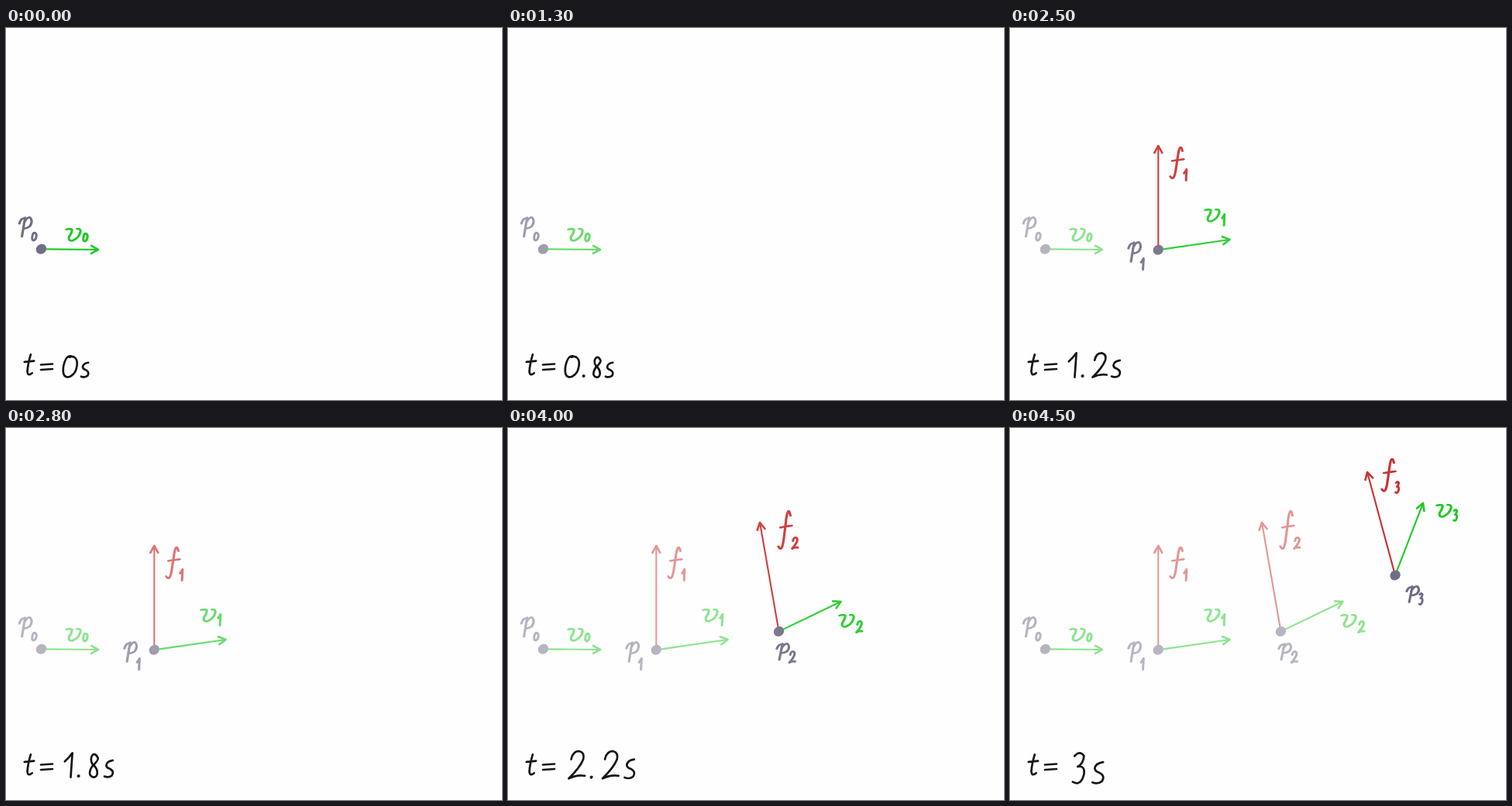
An HTML page for the animation above (6.5 s loop, 640 by 480 pixels).

```html
<!DOCTYPE html>
<html lang="en">
<head>
<meta charset="utf-8">
<title>Point, velocity and force over time</title>
<style>
  html, body { margin: 0; width: 100%; height: 100%; overflow: hidden; background: #fefefe; }
  svg { display: block; width: 100%; height: 100%; }
  path { fill: none; stroke-linecap: round; stroke-linejoin: round; vector-effect: non-scaling-stroke; }
</style>
</head>
<body>
<svg id="stage" viewBox="0 0 640 480"></svg>
<script>
const GRAY = '#716d86', GREEN = '#1fca24', RED = '#cc3030', INK = '#151515';
const LOOP = 6500, PERIOD = 1500, HOLD = 1000, STEP = 100, STEPS = 6;
const PEN = 2.7, DOT = 6.6;

// Pen strokes in a 20 x 20 box, with width / height ratio where it is fixed
const GLYPHS = {
  p: { d: 'M0 7Q3 1 8 2M9 1L4 20M7 7Q12 0 17 1Q22 5 16 10Q12 12 6 12' },
  v: { d: 'M0 2Q5 0 8 2Q8 7 4 13Q2 20 9 19Q18 15 20 5Q20 0 15 1' },
  f: { d: 'M18 3Q15 -2 12 4L8 15Q5 22 0 18.5M3 9L20 8' },
  t: { d: 'M13 0Q7 9 6 16Q7 21 16 17.5M0 7L20 6', ratio: 0.5 },
  s: { d: 'M18 0Q5 1 4 6Q5 9 12 10Q22 13 16 18Q9 21 0 19', ratio: 0.6 },
  0: { d: 'M11 0C3 -1 -1 11 1 17C4 23 17 19 19 10C21 3 16 -1 9 1', ratio: 0.72 },
  1: { d: 'M0 7Q10 4 18 0L14 20', ratio: 0.4 },
  2: { d: 'M3 6Q5 0 13 0Q20 1 18 6Q14 12 0 20Q10 17 20 18', ratio: 0.62 },
  3: { d: 'M3 2Q12 -2 18 2Q17 7 8 9Q20 8 18 14Q13 22 0 19', ratio: 0.45 },
  4: { d: 'M9 0L0 13L20 12M15 6L13 20', ratio: 0.6 },
  6: { d: 'M14 0Q1 8 1 15Q3 21 11 20Q19 18 18 13Q13 9 2 15', ratio: 0.55 },
  8: { d: 'M17 4C10 -3 0 4 7 9C20 14 17 20 9 20C-3 19 3 12 11 9C15 7 18 5 17 4', ratio: 0.5 },
  9: { d: 'M18 4C10 -4 0 4 2 9C5 14 15 9 18 3L13 20', ratio: 0.5 }
};

// Lettering rules; the height grows with the drop of the subscript
const SYMBOLS = {
  p: { color: GRAY, width: 20, subX: 16.5, height: drop => 20 + 0.4 * drop },
  v: { color: GREEN, width: 22, subX: 22, height: () => 19.5 },
  f: { color: RED, width: 21, subX: 18, height: drop => 1.5 * drop }
};

// Dot, arrow tips, and label anchors as [x, y, subscript drop]
const MOMENTS = [
  { dot: [45.5, 285.3], tips: { v: [119, 286] },
    labels: { p: [15.5, 242, 21], v: [76, 257, 7] } },
  { dot: [191.3, 286.3], tips: { f: [191.3, 152], v: [283.5, 273] },
    labels: { p: [151, 274, 22], f: [205, 151, 30], v: [250, 232, 7] } },
  { dot: [349.5, 262.5], tips: { f: [325, 122], v: [429.5, 224] },
    labels: { p: [345, 276, 11], f: [347, 104, 36], v: [426, 239, 9] } },
  { dot: [497, 190], tips: { f: [461, 57], v: [533, 97] },
    labels: { p: [510, 202, 10], f: [478, 37, 31], v: [549, 97, 7] } }
];

const stage = document.getElementById('stage');

function add(parent, tag, attrs = {}) {
  const node = document.createElementNS('http://www.w3.org/2000/svg', tag);
  for (const key in attrs) node.setAttribute(key, attrs[key]);
  return parent.appendChild(node);
}

function stroke(parent, d, color, width, transform = '') {
  add(parent, 'path', { d, stroke: color, 'stroke-width': width, transform });
}

function spot(parent, color, [x, y], r) {
  add(parent, 'ellipse', {
    rx: r * 1.05, ry: r * 0.95, fill: color, transform: `translate(${x} ${y}) rotate(-40)`
  });
}

// A broad nib: the same stroke twice, shifted sideways
function glyph(parent, color, name, x, y, width, height, nib = 0) {
  const sx = (width - PEN - nib) / 20, sy = (height - PEN) / 20;
  for (const shift of new Set([0, nib])) {
    stroke(parent, GLYPHS[name].d, color, PEN - nib / 2,
      `translate(${x + PEN / 2 + shift} ${y + PEN / 2}) scale(${sx} ${sy})`);
  }
}

function arrow(parent, color, [x1, y1], [x2, y2]) {
  const angle = Math.atan2(y2 - y1, x2 - x1);
  const tailX = x1 + DOT * Math.cos(angle), tailY = y1 + DOT * Math.sin(angle);
  stroke(parent, `M${tailX} ${tailY}L${x2} ${y2}`, color, 2.1);
  stroke(parent, 'M-9 -5L0 0L-9 5', color, 2.6,
    `translate(${x2} ${y2}) rotate(${angle * 180 / Math.PI})`);
}

function label(parent, name, index, [x, y, drop]) {
  const { color, width, subX, height } = SYMBOLS[name];
  const subHeight = index ? 17 : 12.5;
  glyph(parent, color, name, x, y, width, height(drop), 0.9);
  glyph(parent, color, index, x + subX, y + drop, subHeight * GLYPHS[index].ratio, subHeight, 0.5);
}

const moments = MOMENTS.map(({ dot, tips, labels }, index) => {
  const group = add(stage, 'g');
  spot(group, GRAY, dot, DOT);
  for (const name in tips) arrow(group, SYMBOLS[name].color, dot, tips[name]);
  for (const name in labels) label(group, name, index, labels[name]);
  return group;
});

glyph(stage, INK, 't', 22.5, 420, 15, 30);
stroke(stage, 'M45 434.5L60 433.5M45 441L60 440', INK, PEN);
const clock = add(stage, 'g');

// The handwriting grows, spreads and sinks a little with every second
function drawClock(value) {
  clock.replaceChildren();
  const second = Math.floor(value);
  const size = 30 + 4 * second, gap = 2 + 1.5 * second;
  const baseline = 452 + 8 * Math.max(0, value - 2);
  let x = 72 + 2.5 * second;
  for (const char of `${value}s`) {
    let width = 10;
    if (char === '.') {
      spot(clock, INK, [x + 2, baseline - 3], 2);
    } else {
      const height = char === 's' ? size * 0.72 : size;
      width = height * GLYPHS[char].ratio;
      glyph(clock, INK, char, x, baseline - height, width, height);
    }
    x += width + gap;
  }
}

// Number of fade steps a moment has taken, 0 to STEPS
function stepsTaken(time, index) {
  if (index === MOMENTS.length - 1) return 0;
  const elapsed = time - index * PERIOD - HOLD;
  return Math.max(0, Math.min(STEPS, Math.floor(elapsed / STEP) + 1));
}

let shown = '';
function render() {
  const time = performance.now() % LOOP;
  const second = Math.min(MOMENTS.length - 1, Math.floor(time / PERIOD));
  const step = stepsTaken(time, second);
  const state = `${second}:${step}`;
  if (state !== shown) {
    shown = state;
    moments.forEach((group, i) => {
      group.setAttribute('opacity', i > second ? 0 : 1 - stepsTaken(time, i) / (2 * STEPS));
    });
    drawClock((10 * second + Math.min(2 * step, 9)) / 10);
  }
  requestAnimationFrame(render);
}
render();
</script>
</body>
</html>
```
